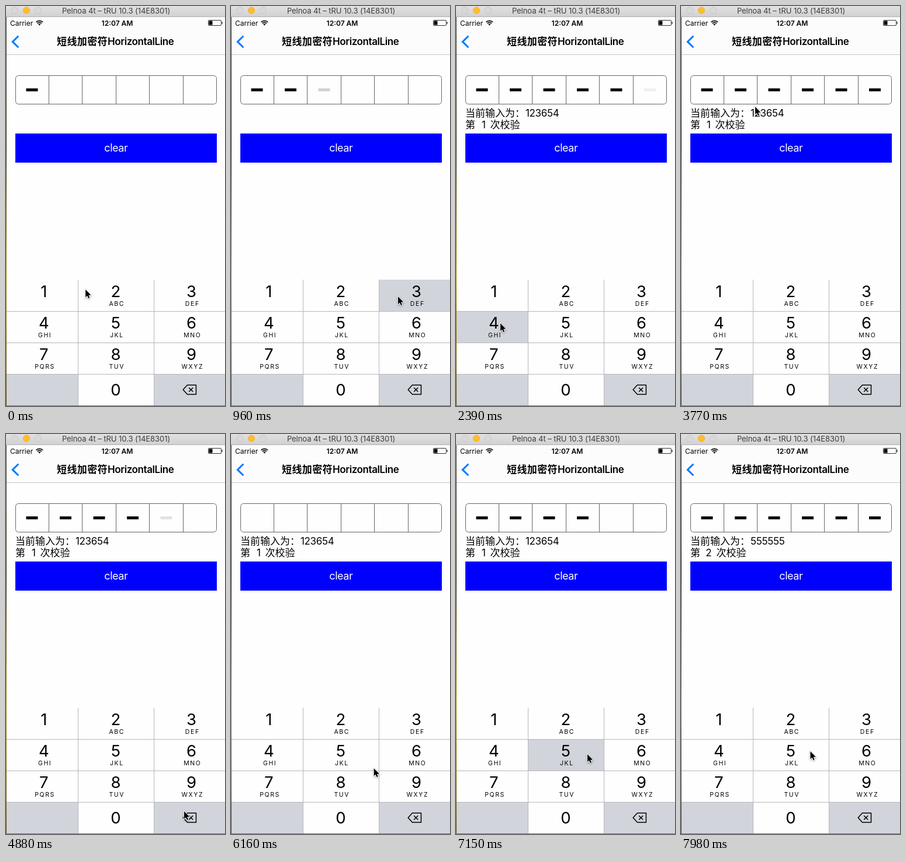
Recreate the animation shown at these times as an HTML page with a canvas. Size 375 by 687 pixels, loop 8000 ms.

```html
<!DOCTYPE html>
<html lang="zh">
<head>
<meta charset="utf-8">
<title>HorizontalLine</title>
<style>
  html, body { margin: 0; width: 100%; height: 100%; overflow: hidden; background: #fefefe; }
  canvas { display: block; width: 375px; height: 687px; }
</style>
</head>
<body>
<canvas id="stage"></canvas>
<script>
const W = 375, H = 687, LOOP = 8000;
const FADE = 200, TRAVEL = 260, CELLS = 6;
const SANS = 'Inter, Roboto, sans-serif';
const CJK = '"Noto Sans CJK SC", "Noto Sans CJK", sans-serif';
const INK = '#000', GREY = '#d1d4da', LINE = '#b6b7bb', PAGE = '#fefefe';

const canvas = document.getElementById('stage');
const ctx = canvas.getContext('2d');
const dpr = window.devicePixelRatio || 1;
canvas.width = W * dpr;
canvas.height = H * dpr;

const clamp = v => Math.max(0, Math.min(1, v));
const smooth = v => { v = clamp(v); return v * v * (3 - 2 * v); };
const mix = (a, b, u) => a + (b - a) * u;

// Evenly spaced taps; "<" is the delete key. Digits count on release, deletes on press.
const burst = (keys, start, gap) => [...keys].map((key, i) => {
  const at = start + gap * i;
  return { key, at, down: key === '<' ? at : at - gap * 0.35, up: at + 60 };
});
const taps = [
  ...burst('23654', 421, 485),
  ...burst('<<<<<<', 4530, 192),
  ...burst('555555', 6318, 211)
];

// Replay the taps to learn which cell each one fades and which codes get checked.
const checks = [];
let code = '1';
for (const tap of taps) {
  const erase = tap.key === '<';
  code = erase ? code.slice(0, -1) : code + tap.key;
  tap.goal = erase ? 0 : 1;
  tap.cell = erase ? code.length : code.length - 1;
  if (code.length === CELLS) checks.push({ at: tap.at, code });
}

// The pointer reaches each key as it goes down, and wanders a little in between.
const spots = { 2: [190, 495], 3: [286, 499], 4: [76, 545], 5: [225, 550], 6: [288, 548], '<': [305, 648] };
const stops = [
  ...taps.filter((tap, i) => !i || taps[i - 1].key !== tap.key)
    .map(tap => ({ at: tap.down, to: spots[tap.key] })),
  { at: 3130, to: [195, 251] },
  { at: 3660, to: [122, 157] },
  { at: 4000, to: [258, 594] },
  { at: 7560, to: [221.5, 545] }
].sort((a, b) => a.at - b.at);

function pointerAt(t) {
  let [x, y] = [136, 487];
  for (const { at, to } of stops) {
    const u = smooth((t - at) / TRAVEL + 1);
    x = mix(x, to[0], u);
    y = mix(y, to[1], u);
  }
  return [x, y];
}

function dashAlpha(cell, t) {
  let a = cell ? 0 : 1;
  for (const tap of taps)
    if (tap.cell === cell) a = mix(a, tap.goal, smooth((t - tap.at) / FADE));
  return a;
}

const isHeld = (key, t) => taps.some(tap => tap.key === key && t >= tap.down && t < tap.up);

function box(x, y, w, h, color) {
  ctx.fillStyle = color;
  ctx.fillRect(x, y, w, h);
}

function text(s, x, y, font, align = 'left', spacing = 0, color = INK) {
  ctx.font = font;
  ctx.fillStyle = color;
  ctx.textAlign = align;
  ctx.letterSpacing = spacing + 'px';
  ctx.fillText(s, x, y);
}

function stroke(color, width) {
  ctx.strokeStyle = color;
  ctx.lineWidth = width;
  ctx.stroke();
}

function poly(points, close) {
  ctx.beginPath();
  points.forEach(([x, y]) => ctx.lineTo(x, y));
  if (close) ctx.closePath();
}

function frame(x, y, w, h, r, color) {
  ctx.beginPath();
  ctx.roundRect(x, y, w, h, r);
  stroke(color, 1);
}

function shade(y0, y1, ...colors) {
  const g = ctx.createLinearGradient(0, y0, 0, y1);
  colors.forEach((c, i) => g.addColorStop(i / (colors.length - 1), c));
  return g;
}

function drawTitleBar() {
  box(0, 0, W, 18, shade(0, 18, '#e2e1e2', '#d2d1d2'));
  box(0, 18, W, 1, '#b3b2b3');
  for (let i = 0; i < 3; i++) {
    ctx.beginPath();
    ctx.arc(15 + 20 * i, 7.5, 5.7, 0, 7);
    ctx.fillStyle = i === 1 ? '#fdbd2f' : '#d9d8d9';
    ctx.fill();
    stroke(i === 1 ? '#f0b236' : '#c3c2c3', 0.8);
  }
  text('Pelnoa 4t – tRU 10.3 (14E8301)', 188.5, 13, `13px ${SANS}`, 'center', -0.05, '#3c3c3c');
}

function drawWifi(x, y) {
  const from = -Math.PI * 0.75, to = -Math.PI * 0.25;
  for (const r of [8.3, 5.2, 1.5]) {
    ctx.beginPath();
    ctx.arc(x, y, r, from, to);
    stroke(INK, r < 2 ? 3 : 1.7);
  }
}

function drawNav() {
  box(0, 19, W, 64, '#fcfcfc');
  box(0, 83, W, 1, '#c6c6c8');
  text('Carrier', 7, 33.5, `12px ${SANS}`);
  drawWifi(57.3, 33.6);
  text('12:07 AM', 190.5, 33.5, `600 12px ${SANS}`, 'center');

  frame(346.5, 24.5, 22, 9, 1.5, '#333');
  box(347.5, 25.5, 6, 7, INK);
  box(369.5, 27.5, 1.5, 3, '#333');

  poly([[21.3, 51.5], [11.3, 61.4], [21.3, 71.3]]);
  stroke('#007aff', 3);
  text('短线加密符', 87, 67.3, `700 17px ${CJK}`, 'left', 0.4);
  text('HorizontalLine', 174, 67.3, `600 17px ${SANS}`, 'left', -0.41);
}

function drawField(t) {
  frame(16.5, 119.5, 344, 49, 5, '#666');
  for (let i = 0; i < CELLS; i++) {
    const x = 16 + 57.5 * i;
    if (i) box(Math.ceil(x) - 1, 120, 1, 48, '#666');
    ctx.globalAlpha = dashAlpha(i, t);
    box(x + 18.5, 141.5, 20, 5, INK);
    ctx.globalAlpha = 1;
  }
}

function drawResult(t) {
  const done = checks.filter(c => t >= c.at);
  if (!done.length) return;
  const zh = `17px ${CJK}`, num = `17px ${SANS}`;
  text('当前输入为：', 16, 190, zh);
  text(done.at(-1).code, 119, 190, num, 'left', -0.35);
  text('第', 16, 210, zh);
  text(done.length, 47.5, 210, num, 'center');
  text('次校验', 56.5 + 2 * done.length, 210, zh);
}

function drawButton() {
  box(16, 219, 345, 50, '#00f');
  text('clear', 188.3, 250.3, `18px ${SANS}`, 'center', -0.43, '#fff');
}

function drawDelete() {
  ctx.lineJoin = 'round';
  poly([[303.2, 659], [310.5, 651], [325.5, 651], [325.5, 667], [310.5, 667]], true);
  stroke(INK, 1.5);
  for (const d of [-3.5, 3.5]) {
    poly([[316.7 - d, 655.5], [316.7 + d, 662.5]]);
    stroke(INK, 1.5);
  }
  ctx.lineJoin = 'miter';
}

const edges = [1, 124, 254, W];
const centers = [64.8, 188, 317.5];
const letters = ' ABC DEF GHI JKL MNO PQRS TUV WXYZ'.split(' ');

function drawKeypad(t) {
  [...'123456789 0<'].forEach((key, i) => {
    const col = i % 3, row = Math.floor(i / 3), y = 470 + 54 * row;
    const light = key !== ' ' && key !== '<';
    box(edges[col], y, edges[col + 1] - edges[col], 54, light !== isHeld(key, t) ? PAGE : GREY);
    if (key === '<') return drawDelete();
    text(key, centers[col], row < 3 ? y + 30 : 669, `27.5px ${SANS}`, 'center');
    text(letters[i] || '', centers[col] + 1.8, y + 45, `10.5px ${SANS}`, 'center', 1.6);
  });
  for (let y = 524; y < H - 50; y += 54) box(1, y, W - 1, 1, LINE);
  for (const x of edges.slice(1, 3)) box(x - 1, 470, 1, 216, LINE);
}

function drawEdges() {
  box(0, 19, 1, H - 19, shade(19, H, '#555550', '#3a3720', '#a8952a', '#5c5020'));
  box(0, H - 1, W, 1, '#77735f');
}

function drawPointer(t) {
  ctx.save();
  ctx.translate(...pointerAt(t));
  ctx.scale(0.93, 0.93);
  poly([[0, 0], [0, 14.2], [3.2, 11.3], [5.3, 16.2], [7.6, 15.2], [5.6, 10.5], [10, 10.3]], true);
  ctx.shadowColor = 'rgba(0,0,0,0.4)';
  ctx.shadowBlur = 3 * dpr;
  ctx.shadowOffsetY = dpr;
  stroke('#fff', 2);
  ctx.shadowColor = 'transparent';
  ctx.fillStyle = INK;
  ctx.fill();
  ctx.restore();
}

function draw(t) {
  ctx.setTransform(dpr, 0, 0, dpr, 0, 0);
  box(0, 0, W, H, PAGE);
  drawTitleBar();
  drawNav();
  drawField(t);
  drawResult(t);
  drawButton();
  drawKeypad(t);
  drawEdges();
  drawPointer(t);
}

let origin;
function tick(now) {
  origin ??= now;
  draw((now - origin) % LOOP);
  requestAnimationFrame(tick);
}
draw(0);
requestAnimationFrame(tick);
</script>
</body>
</html>
```
